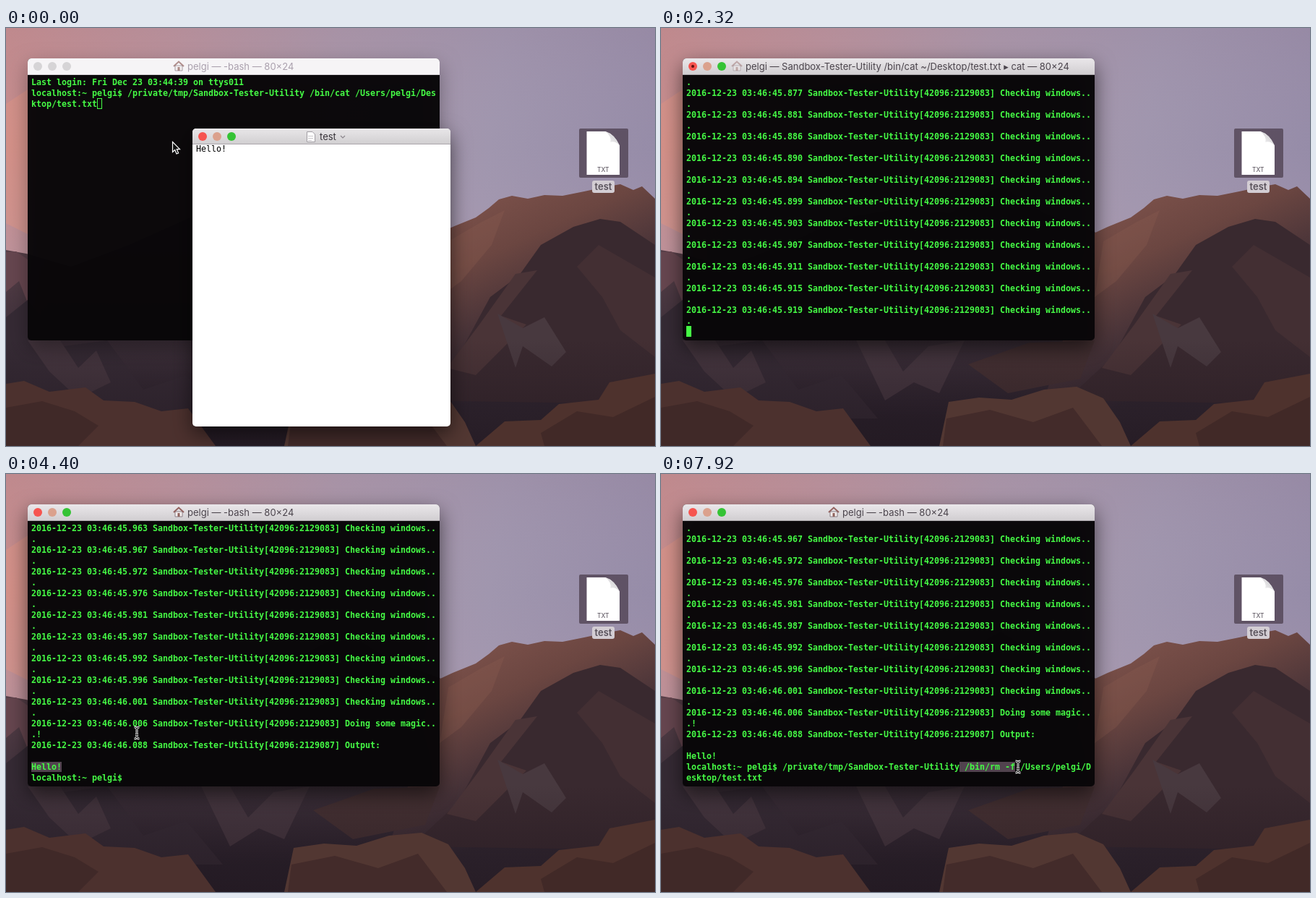
These frames come from a looping animation (898 px wide and 578 px high, 8 s). An HTML page with a canvas:

```html
<!DOCTYPE html>
<html lang="en">
<head>
<meta charset="utf-8">
<title>Terminal demo</title>
<style>
html, body { margin: 0; width: 100%; height: 100%; overflow: hidden; background: #2b2029; }
canvas { display: block; }
</style>
</head>
<body>
<canvas id="stage" width="898" height="578"></canvas>
<script>
const LOOP = 8000, STEP = 80;
const CLOSE = 840, ACTIVE = 1520, RUN = 2080, DONE = 2480, RECALL = 5200;
const USER = 'pelgi', TOOL = 'Sandbox-Tester-Utility';
const MONO = '"DejaVu Sans Mono", monospace', SANS = 'Inter, sans-serif';
const GREEN = '#45fb45', LEFT = 35, CHAR = 7;

const canvas = document.getElementById('stage');
let c = canvas.getContext('2d');

const lerp = (a, b, p) => a + (b - a) * p;
const clamp = (v, a, b) => Math.max(a, Math.min(b, v));

function rect(x, y, w, h, fill, r = 0) {
  c.beginPath();
  c.roundRect(x, y, w, h, r);
  c.fillStyle = fill;
  c.fill();
}

function disc(x, y, r, fill) {
  c.beginPath();
  c.arc(x, y, r, 0, 7);
  c.fillStyle = fill;
  c.fill();
}

function shape(path, fill, stroke, width = 1) {
  const p = new Path2D(path);
  if (fill) { c.fillStyle = fill; c.fill(p); }
  if (stroke) { c.strokeStyle = stroke; c.lineWidth = width; c.stroke(p); }
}

function text(s, x, y, font, fill, align = 'left') {
  c.font = font;
  c.fillStyle = fill;
  c.textAlign = align;
  c.fillText(s, x, y);
}

function grad(x0, y0, x1, y1, ...colors) {
  const g = c.createLinearGradient(x0, y0, x1, y1);
  colors.forEach((k, i) => g.addColorStop(i / (colors.length - 1), k));
  return g;
}

// ---- Desktop ----
function paintWallpaper() {
  rect(0, 0, 898, 578, grad(0, 60, 898, 160, '#c98c8b', '#bd929a', '#ab97a9', '#a096ae', '#968ca8'));
  rect(0, 0, 898, 330, grad(0, 0, 0, 330, 'rgba(150,125,150,.2)', 'rgba(170,155,180,0)', 'rgba(176,155,176,.4)'));
  shape('M0 105L30 85V285L0 270Z', 'rgba(224,150,134,.5)');

  // far ridges
  shape('M0 307L28 312L90 330L170 300L255 262L330 250L400 256L470 218L530 256L600 282L660 330V578H0Z',
    grad(0, 300, 0, 540, '#594049', '#3f313b', '#2a212b'));
  shape('M0 310L14 309L30 320V380L18 350L0 365Z', '#66464f');
  shape('M0 400L30 376L80 440L140 432L190 500L250 480L300 540H0Z', '#352a34');
  shape('M30 432L75 432L100 470L125 446L145 490L100 512L60 475Z', '#44353e');
  shape('M270 432L310 432L335 475L370 440L420 432L385 505L350 490L310 515Z', '#45363f');

  // sunlit mountain
  shape('M590 288L618 275L650 262L668 249L682 237L700 232L722 236L745 231L770 232L800 226L828 220L850 216L868 224L880 219L898 236V578H510L560 420Z',
    grad(640, 230, 750, 470, '#7d524b', '#6b4641', '#483338', '#302630'));
  shape('M612 295L655 270L690 252L672 300L630 350L600 372Z', 'rgba(140,93,82,.3)');
  shape('M898 300L850 268L822 264L785 275L740 300L710 342L670 372L625 455L560 515L898 520Z', '#39292f');
  shape('M705 340L735 335L685 398L720 410L650 480L610 470L655 410Z', '#4a3437');
  shape('M790 330L820 300L898 345V455L850 418L825 372Z', '#432f33');
  shape('M680 395L715 415L745 400L775 448L755 468L715 440L705 470Z', '#48393f');
  shape('M425 465L510 435L600 432L580 485L480 505Z', '#443032');
  rect(0, 430, 898, 148, grad(0, 430, 0, 578, 'rgba(30,20,28,0)', 'rgba(30,20,28,.5)'));

  // foreground boulders
  shape('M0 492L25 488L60 503L110 497L135 515L178 517L215 530L252 526L290 578H0Z', '#4c312e');
  shape('M385 578L398 517L440 511L485 514L530 500L575 496L612 512L635 545L650 578Z', '#523732');
  shape('M650 578L690 544L740 542L765 520L820 514L835 490L898 478V578Z', '#4e322d');
  shape('M0 525L50 516L95 530L128 550L100 578H0Z', '#402928');
  shape('M395 540L455 528L515 545L570 525L610 578H390Z', '#432b2a');
  shape('M740 560L790 530L840 538L898 510V578H745Z', '#412927');
}

function paintDoc(x, y, w, h, ink = '#514a55', base = .94) {
  const f = w * .43, r = x + w;
  shape(`M${x} ${y}H${r - f}Q${r - f * .35} ${y + f * .2} ${r} ${y + f}V${y + h}H${x}Z`, '#fff');
  shape(`M${r - f} ${y}Q${r - f * .55} ${y + f * .35} ${r - f * .65} ${y + f * .75}Q${r - f * .3} ${y + f * .65} ${r} ${y + f}Q${r - f * .35} ${y + f * .2} ${r - f} ${y}Z`,
    grad(r - f, y + f, r, y, '#f8f8f8', '#c9c7cb'));
  text('TXT', x + w / 2, y + h * base, `${w * .19}px ${SANS}`, ink, 'center');
}

function paintIcon() {
  rect(793, 139, 68, 68, 'rgba(82,68,84,.8)', 2);
  paintDoc(803.5, 143, 45.5, 60);
  rect(811, 211, 31, 17, '#d3cdd3', 3);
  text('test', 826.5, 224, `600 13px ${SANS}`, '#58515a', 'center');
}

const backdrop = document.createElement('canvas');
backdrop.width = 898;
backdrop.height = 578;
const main = c;
c = backdrop.getContext('2d');
paintWallpaper();
paintIcon();
c = main;

// ---- Windows ----
function frame(x, y, w, h, fill, strength) {
  c.save();
  c.shadowColor = `rgba(0,0,0,${strength})`;
  c.shadowBlur = 28;
  c.shadowOffsetY = 10;
  rect(x, y, w, h, fill, 5);
  c.restore();
}

function lights(x, y, on, edited) {
  const colors = on ? ['#f6544f', '#dba18d', '#35c335'] : ['#d6d4d6', '#d6d4d6', '#d6d4d6'];
  colors.forEach((k, i) => disc(x + 20 * i, y, 6, k));
  if (edited) disc(x, y, 2, '#5c100e');
}

function house(x, y, alpha) {
  c.globalAlpha = alpha;
  shape(`M${x + 2} ${y + 6}H${x + 12}V${y + 13}H${x + 2}Z`, '#f4eeee', '#8a7f86');
  shape(`M${x} ${y + 7}L${x + 7} ${y + .5}L${x + 14} ${y + 7}`, null, '#93625f', 2);
  rect(x + 5.5, y + 8, 3, 5, '#8f625c');
  c.globalAlpha = 1;
}

function paintEditor() {
  frame(258, 139, 357, 412, '#fff', .55);
  rect(258, 139, 357, 22, grad(0, 139, 0, 161, '#e9e7e9', '#d0ced0'), [5, 5, 0, 0]);
  rect(258, 160, 357, 1, '#aaa5ab');
  lights(272, 150, true);
  shape('M416.5 143.5H424L427.5 147V157.5H416.5Z', '#fff', '#a09ca2');
  shape('M418 149.5H425M418 152.5H425M418 155.5H423', null, '#c9c5ca');
  text('test', 434, 155, `13px ${SANS}`, '#373238');
  shape('M463 149L466 152L469 149', null, '#8b868c', 1.2);
  text('Hello!', 263, 171, `11.63px ${MONO}`, '#000');
}

function paintClosing(p) {
  const x = lerp(258, 802, p), y = lerp(139, 151, p), w = lerp(357, 41, p), h = lerp(412, 52, p);
  const morph = clamp(p * 2, 0, 1);
  c.globalAlpha = 1 - morph;
  rect(x, y, w, h, '#fff', 4);
  c.globalAlpha = morph;
  paintDoc(x, y, w, h, '#a29da8', 1);
  c.globalAlpha = 1;
}

// ---- Terminal text ----
const prompt = `localhost:~ ${USER}$ `;
const command = args => `${prompt}/private/tmp/${TOOL} /bin/${args} /Users/${USER}/Desktop/test.txt`;

const stamps = [];
for (let i = 30; i > 0; i--) stamps.push(Math.round(877 - 4.2 * i));
stamps.push(877, 881, 886, 890, 894, 899, 903, 907, 911, 915, 919);
for (let i = 1; i < 10; i++) stamps.push(Math.round(919 + 4.4 * i));
stamps.push(963, 967, 972, 976, 981, 987, 992, 996, 1001);

const log = (ms, thread, msg) =>
  `2016-12-23 03:46:${(45 + ms / 1000).toFixed(3)} ${TOOL}[42096:${thread}] ${msg}`;

function screen(t) {
  const lines = ['Last login: Fri Dec 23 03:44:39 on ttys011', command('cat')];
  if (t >= RUN) {
    const now = t - 1400;
    for (const ms of stamps)
      if (ms <= now || t >= DONE) lines.push(log(ms, 2129083, 'Checking windows...'));
    if (t >= DONE)
      lines.push(log(1006, 2129083, 'Doing some magic...!'), log(1088, 2129087, 'Output:'),
        '', 'Hello!', t < RECALL ? prompt : command('rm -f'));
    else lines.push('');
  }
  return lines.flatMap(s => s.match(/.{1,80}/g) || ['']).slice(-24);
}

function selection(t, x) {
  const col = Math.round((x - LEFT) / CHAR);
  if (t >= 3280 && t < RECALL) return [t < 3680 ? clamp(col, 0, 6) : 0, 6];
  if (t >= 6880) return [54, clamp(col, 54, 65)];
  return null;
}

function cursorOn(t) {
  if (t < DONE) return true;
  return (t - (t < RECALL ? DONE : RECALL)) % 1000 < 500;
}

function paintTerminal(t, mouseX) {
  const active = t >= ACTIVE, running = t >= RUN && t < DONE + STEP;
  frame(30, 42, 570, 390, 'rgba(9,7,9,.97)', active ? .6 : .35);
  rect(30, 42, 570, 23, active ? grad(0, 42, 0, 65, '#eae7ea', '#d0cdd0') : '#f6f4f6', [5, 5, 0, 0]);
  rect(30, 64, 570, 1, active ? '#aba6ab' : '#d8d4d8');
  lights(44, 53, active, running);
  house(running ? 98 : 232, 46, running ? .45 : active ? 1 : .7);
  const title = running
    ? `${USER} — ${TOOL} /bin/cat ~/Desktop/test.txt ▸ cat — 80×24`
    : `${USER} — -bash — 80×24`;
  text(title, running ? 117 : 251, 58, `13px ${SANS}`, active ? '#4b444c' : '#aaa0ad');

  const sel = selection(t, mouseX);
  if (sel) rect(LEFT + sel[0] * CHAR, 398, (sel[1] - sel[0]) * CHAR, 14, '#51434e');

  const rows = screen(t);
  rows.forEach((s, i) => text(s, LEFT, 79 + 15 * i, `bold 11.63px ${MONO}`, GREEN));

  const x = LEFT + rows.at(-1).length * CHAR, y = 67 + 15 * (rows.length - 1);
  if (!active) {
    c.strokeStyle = GREEN;
    c.lineWidth = 1;
    c.strokeRect(x + .5, y + .5, 6, 14);
  } else if (cursorOn(t)) rect(x, y, 7, 15, GREEN);
}

// ---- Mouse: time, x, y ----
const path = [
  [0, 230, 157], [160, 230, 157], [720, 272, 150], [1120, 272, 150], [1440, 255, 181],
  [2560, 255, 181], [3200, 78, 406], [3280, 78, 406], [3680, 35, 406], [3760, 35, 406],
  [4320, 181, 358], [5200, 181, 358], [5520, 183, 355], [5920, 183, 355], [6720, 413, 405],
  [6880, 413, 405], [7680, 494, 405], [LOOP, 494, 405]
];

function mouseAt(t) {
  const i = path.findIndex(k => k[0] > t);
  const a = path[i - 1], b = path[i];
  const p = (t - a[0]) / (b[0] - a[0]), e = p * p * (3 - 2 * p);
  return [lerp(a[1], b[1], e), lerp(a[2], b[2], e)];
}

function paintMouse(t, x, y) {
  if (t >= 2000 && t < DONE) return;
  c.save();
  c.translate(Math.round(x), Math.round(y));
  if (t < 1400) {
    shape('M.5 .5V14.5L3.7 11.5L6 17L8.6 16L6.3 10.6H10.5Z', '#111', '#fff', 1.2);
  } else {
    const beam = 'M-3.5 -8Q0 -8 0 -5.5Q0 -8 3.5 -8M0 -6V6M-3.5 8Q0 8 0 5.5Q0 8 3.5 8M-2 2.5H2';
    shape(beam, null, '#e8e8e8', 3);
    shape(beam, null, '#222', 1);
  }
  c.restore();
}

function draw(t) {
  const [mx, my] = mouseAt(t);
  c.drawImage(backdrop, 0, 0);
  paintTerminal(t, mx);
  const p = (t - CLOSE) / 240;
  if (p < 0) paintEditor();
  else if (p < 1) paintClosing(p);
  paintMouse(t, mx, my);
}

const start = performance.now();
function tick() {
  const t = (performance.now() - start) % LOOP;
  draw(Math.floor(t / STEP) * STEP);
  requestAnimationFrame(tick);
}
tick();
</script>
</body>
</html>
```
